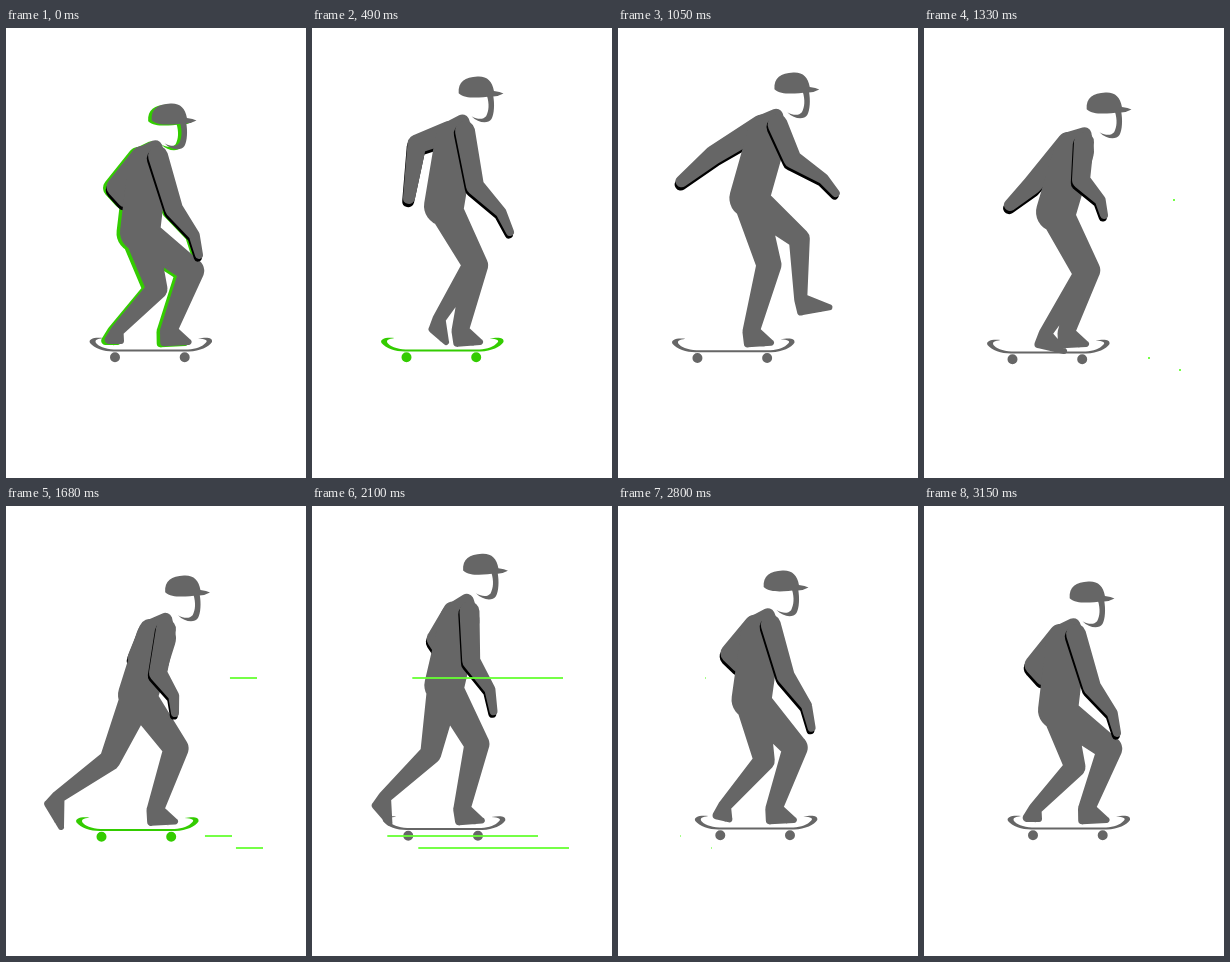
Recreate the animation shown at these times as an HTML page with a canvas. Size 300 px wide and 450 px high, loop 3220 ms.

```html
<!DOCTYPE html>
<html lang="en">
<head>
<meta charset="utf-8">
<title>Skateboarder</title>
<style>
html, body { margin: 0; width: 100%; height: 100%; overflow: hidden; background: #fff; }
canvas { display: block; width: 300px; height: 450px; }
</style>
</head>
<body>
<canvas id="stage" width="300" height="450"></canvas>
<script>
const LOOP = 3220, STEP = 70;
const GREY = '#666', GREEN = '#3c0', LIME = '#6f3';

// Key poses of a small skeleton; every other joint is derived from these.
const crouch = {
  head: [163, 86], chest: [142, 137], hip: [134, 204], board: [0, 0],
  elbow: [168, 181], hand: [193, 227], rearElbow: [110, 159], rearHand: [118, 173],
  knee: [151, 261], ankle: [111, 303], toe: [115, 313]
};
const rise = {
  head: [164, 59], chest: [143, 112], hip: [132, 178], board: [-14.5, 0],
  elbow: [163, 158], hand: [198, 204], rearElbow: [105, 116], rearHand: [97, 170],
  knee: [161, 237], ankle: [127, 291], toe: [134, 314]
};
const kick = {
  head: [168, 44], chest: [149, 97], hip: [131, 163], board: [-33.5, 0],
  elbow: [184, 122], hand: [238, 156], rearElbow: [92, 107], rearHand: [56, 138],
  knee: [188, 191], ankle: [207, 249], toe: [239, 251]
};
const step = {
  head: [180, 75], chest: [150, 123], hip: [132, 184], board: [-20.5, 2],
  elbow: [157, 152], hand: [180, 187], rearElbow: [108, 157], rearHand: [86, 177],
  knee: [160, 246], ankle: [121, 306], toe: [140, 323]
};
const push = {
  head: [176.5, 80], chest: [150, 132], hip: [132, 189], board: [-13.5, 1.5],
  elbow: [152, 167], hand: [169, 207], rearElbow: [131, 152], rearHand: [130, 162],
  knee: [104, 254], ankle: [52, 291], toe: [55, 321]
};
const glide = {
  head: [163, 67], chest: [144, 121], hip: [133, 186], board: [-12, 0],
  elbow: [167, 162], hand: [194, 216], rearElbow: [115, 139], rearHand: [123, 151],
  knee: [139, 250], ankle: [99, 297], toe: [105, 314]
};
const KEYS = [
  [0, crouch], [490, rise], [840, kick], [1330, step],
  [1680, push], [2520, glide], [3150, crouch], [LOOP, crouch]
];

const cap = new Path2D('M-17 5C-17-6-10-10 2-10C11-10 16-5 17 5Q23 6 26 8Q20 11 14 10C5 10-10 12-17 5Z');
const jaw = new Path2D('M16 9C17 18 16 27 13 32C9 37 0 35-6 28C0 32 5 32 8 29C11 24 12 17 10 9Z');
const deck = new Path2D('M97 310C88 309 82 311 84 315C88 320 98 323.5 107 323.5H183' +
  'C194 323 203 319 206 314C207 309 200 309 192 310.5C200 311 202 312.5 200 314.5' +
  'C196 319 190 321 182 321.5H108C99 321 92 318 90 315C88.5 312 91 311 97 310Z');

const ctx = document.getElementById('stage').getContext('2d');
const clamp = v => Math.min(1, Math.max(0, v));
const inOut = u => u < .5 ? 4 * u ** 3 : 1 - 4 * (1 - u) ** 3;
const within = (t, a, b) => t >= a && t < b;
const add = ([x, y], dx, dy) => [x + dx, y + dy];
const mix = (a, b, k) => [a[0] + (b[0] - a[0]) * k, a[1] + (b[1] - a[1]) * k];
const dist = (a, b) => Math.hypot(b[0] - a[0], b[1] - a[1]);

// Monotone cubic interpolation of one coordinate through the key poses.
function sample(joint, axis, t) {
  const value = k => KEYS[k][1][joint][axis];
  const slope = k => (value(k + 1) - value(k)) / (KEYS[k + 1][0] - KEYS[k][0]);
  const tangent = k => {
    if (k === 0 || k === KEYS.length - 1) return 0;
    const a = slope(k - 1), b = slope(k);
    return a * b > 0 ? 2 * a * b / (a + b) : 0;
  };
  let k = 0;
  while (t >= KEYS[k + 1][0]) k++;
  const span = KEYS[k + 1][0] - KEYS[k][0], u = (t - KEYS[k][0]) / span, v = 1 - u;
  return value(k) * (1 + 2 * u) * v * v + value(k + 1) * (3 - 2 * u) * u * u +
    span * u * v * (tangent(k) * v - tangent(k + 1) * u);
}

function poseAt(t) {
  // The rider straightens up after the push.
  const stretch = 16 * Math.sin(Math.PI * clamp((t - 1680) / 840));
  const p = {};
  for (const joint in crouch) {
    const x = sample(joint, 0, t), y = sample(joint, 1, t);
    p[joint] = [x, joint === 'board' ? y : y - stretch * Math.max(0, 322 - y) / 260];
  }
  p.neck = mix(p.chest, p.head, .35);
  p.shoulder = add(p.chest, 10, -9);
  p.rearShoulder = add(p.chest, -6, -8);
  p.wrist = add(mix(p.elbow, p.hand, .57), 6, 0);

  // The standing foot rides the board; its knee bends as the hip sinks.
  p.standAnkle = add(p.board, 162.5, 303);
  p.standToe = add(p.standAnkle, 20, 11);
  const reach = dist(p.hip, p.standAnkle), bend = (39 - .66 * (reach - 103)) / reach;
  p.standKnee = add(mix(p.hip, p.standAnkle, .5),
    (p.standAnkle[1] - p.hip[1]) * bend, (p.hip[0] - p.standAnkle[0]) * bend);
  return p;
}

// A tapered limb: joints and radii in turn.
function limb(path, ...parts) {
  for (let i = 0; i + 3 < parts.length; i += 2) {
    const [a, ra, b, rb] = parts.slice(i, i + 4);
    const angle = Math.atan2(b[1] - a[1], b[0] - a[0]);
    const spread = Math.acos(Math.max(-1, Math.min(1, (ra - rb) / (dist(a, b) || 1))));
    path.moveTo(a[0] + ra * Math.cos(angle + spread), a[1] + ra * Math.sin(angle + spread));
    path.arc(...a, ra, angle + spread, angle - spread + 2 * Math.PI);
    path.arc(...b, rb, angle - spread, angle + spread);
    path.closePath();
  }
  return path;
}

function leg(path, hip, knee, kneeSize, ankle, ankleSize, toe) {
  const heel = mix(ankle, knee, -12 / dist(ankle, knee));
  limb(path, hip, 17, knee, kneeSize, ankle, ankleSize, toe, 3, heel, 4, ankle, ankleSize);
  limb(path, mix(ankle, heel, .5), 5, mix(toe, heel, .3), 3.5);
}

function bodyPath(p) {
  const path = limb(new Path2D(), p.hip, 20, p.chest, 20, p.neck, 7);
  leg(path, p.hip, p.standKnee, 12.5, p.standAnkle, 8.5, p.standToe);
  leg(path, p.hip, p.knee, 10.5, p.ankle, 6.5, p.toe);
  return path;
}

function fill(color, dx, dy, ...paths) {
  ctx.save();
  ctx.translate(dx, dy);
  ctx.fillStyle = color;
  paths.forEach(path => ctx.fill(path));
  ctx.restore();
}

function drawHead([x, y], color, dx, dy) {
  ctx.save();
  ctx.translate(x + dx, y + dy);
  ctx.rotate(-.06);
  ctx.scale(1.04, 1.03);
  fill(color, 0, 0, cap, jaw);
  ctx.restore();
}

function drawBoard([x, y], color) {
  const wheels = new Path2D();
  for (const cx of [109, 178.7]) {
    wheels.moveTo(cx, 329);
    wheels.arc(cx, 329.2, 5, 0, 7);
  }
  fill(color, x, y, deck, wheels);
}

function drawSpeedLines(t) {
  const front = inOut(clamp((t - 1300) / 1100)) * 164;
  const tail = inOut(clamp((t - 2190) / 710) ** .69) * 164;
  if (t < 1300 || tail >= 164) return;
  ctx.fillStyle = LIME;
  for (const [x, y] of [[251, 172], [226, 330], [257, 342]]) {
    const length = Math.max(front, 2) - tail;
    ctx.fillRect(x - tail - length, y - .9, length, 1.8);
  }
}

function draw(t) {
  const p = poseAt(t);
  const body = bodyPath(p);
  const arm = limb(new Path2D(), p.shoulder, 10, p.elbow, 9, p.wrist, 5.5, p.hand, 4);
  const rearArm = limb(new Path2D(), p.rearShoulder, 11, p.rearElbow, 9.5, p.rearHand, 6);
  const boardFlash = within(t, 420, 630) || within(t, 1610, 1820);
  const ghost = t < 280 || within(t, 770, 980);

  ctx.clearRect(0, 0, 300, 450);
  drawBoard(p.board, boardFlash ? GREEN : GREY);
  if (ghost) {
    fill(GREEN, -3.5, 1, body, arm, rearArm);
    drawHead(p.head, GREEN, -3.5, 1);
  }
  fill('#000', -.8, 3.2, rearArm);
  fill(GREY, 0, 0, rearArm, body);
  fill('#000', -1.2, 2.6, arm);
  fill(GREY, 0, 0, arm);
  drawHead(p.head, GREY, 0, 0);
  drawSpeedLines(t);
}

function tick() {
  draw(Math.floor(performance.now() % LOOP / STEP) * STEP);
  requestAnimationFrame(tick);
}
tick();
</script>
</body>
</html>
```
